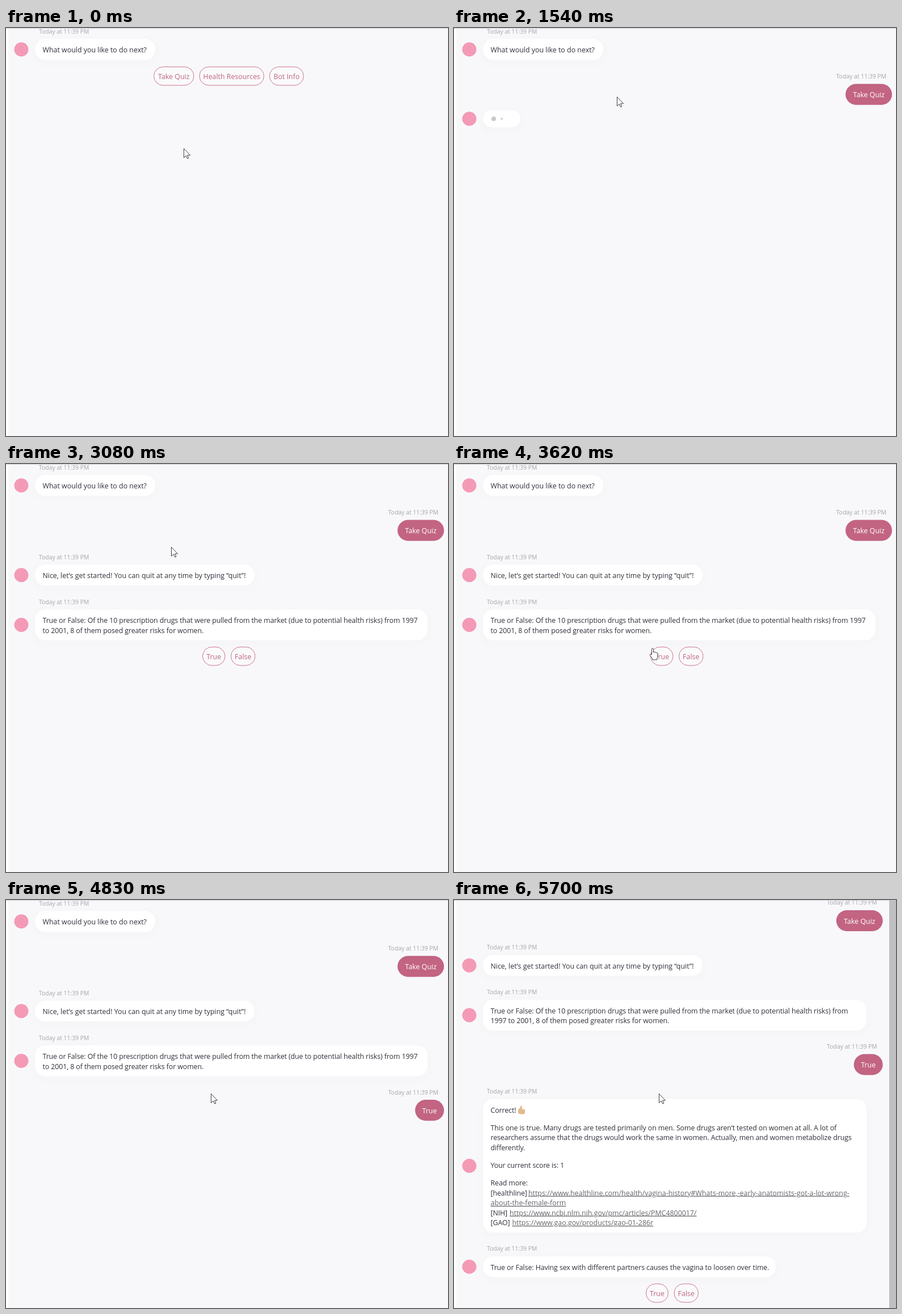
Recreate the animation shown at these times as an HTML page. Size 779 by 719 pixels, loop 6.3 s.

```html
<!DOCTYPE html>
<html lang="en">
<head>
<meta charset="utf-8">
<title>Quiz chat</title>
<style>
html, body { margin: 0; width: 100%; height: 100%; overflow: hidden; background: #f8f8fa; }
svg { display: block; }
text { font: 12.4px "Open Sans", "Noto Sans", sans-serif; fill: #30303b; }
.tight { letter-spacing: -.1px; }
.time { font-size: 10.4px; fill: #a4a4ae; }
.mid { text-anchor: middle; }
.end { text-anchor: end; }
.link { fill: #66666c; letter-spacing: 0; text-decoration: underline; }
.bubble { fill: #fff; filter: drop-shadow(0 4px 8px rgba(40, 40, 80, .02)); }
.avatar { fill: #f49ab6; }
.mine rect { fill: #c26482; }
.mine .mid { fill: #fff; }
.pill rect { fill: #fafafb; stroke: #cf7391; }
.pill text { fill: #bd6580; }
.dot { fill: #cbc7ca; }
.cursor { fill: #fff; stroke: #2a2a2e; stroke-width: .9; stroke-linejoin: round; }
</style>
</head>
<body>
<svg id="stage" width="779" height="719" viewBox="0 0 779 719"></svg>
<script>
const LOOP = 6300, STEP = LOOP / 94, SCROLL = 5700;
const stage = document.getElementById('stage');

const label = (x, y, text, cls = '') => `<text x="${x}" y="${y}" class="${cls}">${text}</text>`;
const stamp = (x, y, cls = '') => label(x, y, 'Today at 11:39 PM', 'time ' + cls);
const avatar = y => `<circle class="avatar" cx="27" cy="${y}" r="12.5"/>`;
const bubble = (y, w, h, r = 18) =>
  `<rect class="bubble" x="51" y="${y}" width="${w}" height="${h}" rx="${r}"/>`;
const link = (x, text) => `<tspan class="link" x="${x}">${text}</tspan>`;

// lines: [offset from the bubble top, text]
const bot = (y, w, h, lines, cls = '') =>
  stamp(58, y - 10) + avatar(y + h / 2) + bubble(y, w, h) +
  lines.map(([dy, text]) => label(64.5, y + dy, text, cls)).join('');

const mine = (x, y, text) => `<g class="mine">
  <rect x="${x}" y="${y}" width="${772 - x}" height="37" rx="18.5"/>
  ${label((x + 772) / 2, y + 23.5, text, 'mid')}</g>`;

const pills = (y, list) => list.map(([x, w, text]) => `<g class="pill">
  <rect x="${x}" y="${y}" width="${w}" height="32.5" rx="16.25"/>
  ${label(x + w / 2, y + 21.5, text, 'mid')}</g>`).join('');

const typing = (y, start) => avatar(y + 15) + bubble(y, 66, 30, 15) +
  [0, 1, 2].map(i => `<circle class="dot" data-start="${start + i * 160}" cx="${70 + i * 14}" cy="${y + 15}"/>`).join('');

const question = 'True or False: Of the 10 prescription drugs that were pulled from the market ' +
  '(due to potential health risks) from';

const answer = (w, skin) => bot(431.5, w, 235, [
  [23.5, 'Correct!'],
  [54.5, 'This one is true. Many drugs are tested primarily on men. Some drugs aren’t tested on women at all. A lot of'],
  [72, 'researchers assume that the drugs would work the same in women. Actually, men and women metabolize drugs'],
  [89.5, 'differently.'],
  [120.5, 'Your current score is: 1'],
  [152, 'Read more:'],
  [169.5, '[healthline] ' + link(131, 'https://www.healthline.com/health/vagina-history#Whats-more,-early-anatomists-got-a-lot-wrong-')],
  [187, link(64.5, 'about-the-female-form')],
  [204.5, '[NIH] ' + link(98, 'https://www.ncbi.nlm.nih.gov/pmc/articles/PMC4800017/')],
  [222, '[GAO] ' + link(102.5, 'https://www.gao.gov/products/gao-01-286r')]
], 'tight') + `<path fill="${skin}" d="M113 451q0-2 2-3q2-1 2-4q1-2 2.5 0q1 2 0 5h4q1.500 0 1.500 1.500v4q0 3.500-3.500 3.500h-5q-3.500-1-3.500-4z"/>`;

// [from, to, markup, horizontal shift after scrolling]
const parts = [
  [0, LOOP, bot(19.5, 212, 36.5, [[23.5, 'What would you like to do next?']])],
  [0, 540, pills(68.5, [[260.5, 70.5, 'Take Quiz'], [341, 113.5, 'Health Resources'], [464.5, 60, 'Bot Info']])],
  [600, LOOP, mine(690, 98.5, 'Take Quiz'), -16.3],
  [760, LOOP, stamp(762, 88.5, 'end'), -16.3],
  [1330, 1670, typing(145, 1300)],
  [1670, LOOP, bot(177.5, 387, 36.5, [[23.5, 'Nice, let’s get started! You can quit at any time by typing “quit”!']])],
  [2320, 2460, typing(223.5, 2300)],
  [2460, SCROLL, bot(256.5, 692, 54, [[23.5, question + ' 1997'],
    [41, 'to 2001, 8 of them posed greater risks for women.']], 'tight')],
  [2460, 4360, pills(322.5, [[346.5, 39.5, 'True'], [396.5, 42.5, 'False']])],
  [4430, LOOP, mine(721, 352, 'True'), -16.3],
  [4630, LOOP, stamp(762, 342.5, 'end'), -16.3],
  [5160, SCROLL, answer(692, '#ffc83d')],
  [5360, SCROLL, typing(676, 5390)],
  [SCROLL, LOOP, bot(256.5, 676, 54, [[23.5, question],
    [41, '1997 to 2001, 8 of them posed greater risks for women.']], 'tight')],
  [SCROLL, LOOP, answer(676, '#e3ba8c')],
  [SCROLL, LOOP, bot(708.5, 516, 36.5, [[23.5, 'True or False: Having sex with different partners causes the vagina to loosen over time.']], 'tight') +
    pills(757, [[338.5, 39, 'True'], [388, 42.5, 'False']])]
];

stage.innerHTML = `<path fill="#f8f8fa" d="M0 0h779v719H0z"/><path fill="#fff" d="M0 0h4v719H0z"/>
  <g id="chat">${parts.map(p => `<g>${p[2]}</g>`).join('')}</g>
  <path id="bar" fill="#bfbfc1" d="M767 1h12v718h-12z"/>
  <path fill="#cdcdd1" d="M0 0h779v1H0z"/>
  <g id="cursor" class="cursor">
    <path d="M.5 .5V16.5L4.2 13 6.7 18.2 8.9 17.2 6.5 12.2H11.5Z"/>
    <path d="M-1.5 11V1.5a1.5 1.5 0 0 1 3 0V7a1.4 1.4 0 0 1 2.7 .4a1.4 1.4 0 0 1 2.6 .6a1.3 1.3 0 0 1 2.2 .7V13c0 3-1.500 4-1.500 7H0c0-3-3-5-4.600-8c-.7-1.600 1-2.400 2-1.400Z"/>
  </g>`;

const chat = document.getElementById('chat');
const bar = document.getElementById('bar');
const cursor = document.getElementById('cursor');
const [arrow, hand] = cursor.children;
const groups = [...chat.children];
const dots = [...document.querySelectorAll('.dot')];
const show = (node, on) => node.setAttribute('visibility', on ? 'visible' : 'hidden');
const clamp = v => Math.min(1, Math.max(0, v));

// pointer tip: [step, x, y]
const path = [
  [0, 313, 212], [4, 264, 77], [19, 264, 77], [23, 287, 121], [26, 291, 140],
  [45, 291, 140], [46, 291, 146], [55, 357, 347], [56, 364, 353], [58, 364, 353],
  [62, 361, 343], [65, 361, 341], [94, 361, 341]
];

function pointer(step) {
  const i = path.findIndex(p => p[0] > step);
  if (i < 0) return path[path.length - 1].slice(1);
  const [s, x, y] = path[i - 1], [s2, x2, y2] = path[i];
  const u = (step - s) / (s2 - s);
  return [Math.round(x + (x2 - x) * u), Math.round(y + (y2 - y) * u)];
}

function draw(t) {
  const step = Math.floor((t + 11) / STEP);
  const at = Math.min(t + 5, LOOP - 1);
  const scrolled = at >= SCROLL;

  parts.forEach(([from, to, , shift = 0], i) => {
    show(groups[i], at >= from && at < to);
    groups[i].setAttribute('transform', `translate(${scrolled ? shift : 0})`);
  });
  for (const dot of dots) dot.setAttribute('r', 4 * clamp((step * STEP - dot.dataset.start) / 180));
  chat.setAttribute('transform', `translate(0 ${scrolled ? -80.5 : 0})`);
  show(bar, scrolled);

  const [x, y] = pointer(step);
  const overQuiz = at < 540 && x > 260 && x < 331 && y > 68 && y < 101;
  const overTrue = at >= 2460 && at < 4360 && x > 346 && x < 386 && y > 322 && y < 355;
  cursor.setAttribute('transform', `translate(${x} ${y})`);
  show(hand, overQuiz || overTrue);
  show(arrow, !(overQuiz || overTrue));
}

const start = performance.now();
function tick() {
  draw((performance.now() - start) % LOOP);
  requestAnimationFrame(tick);
}
tick();
</script>
</body>
</html>
```
